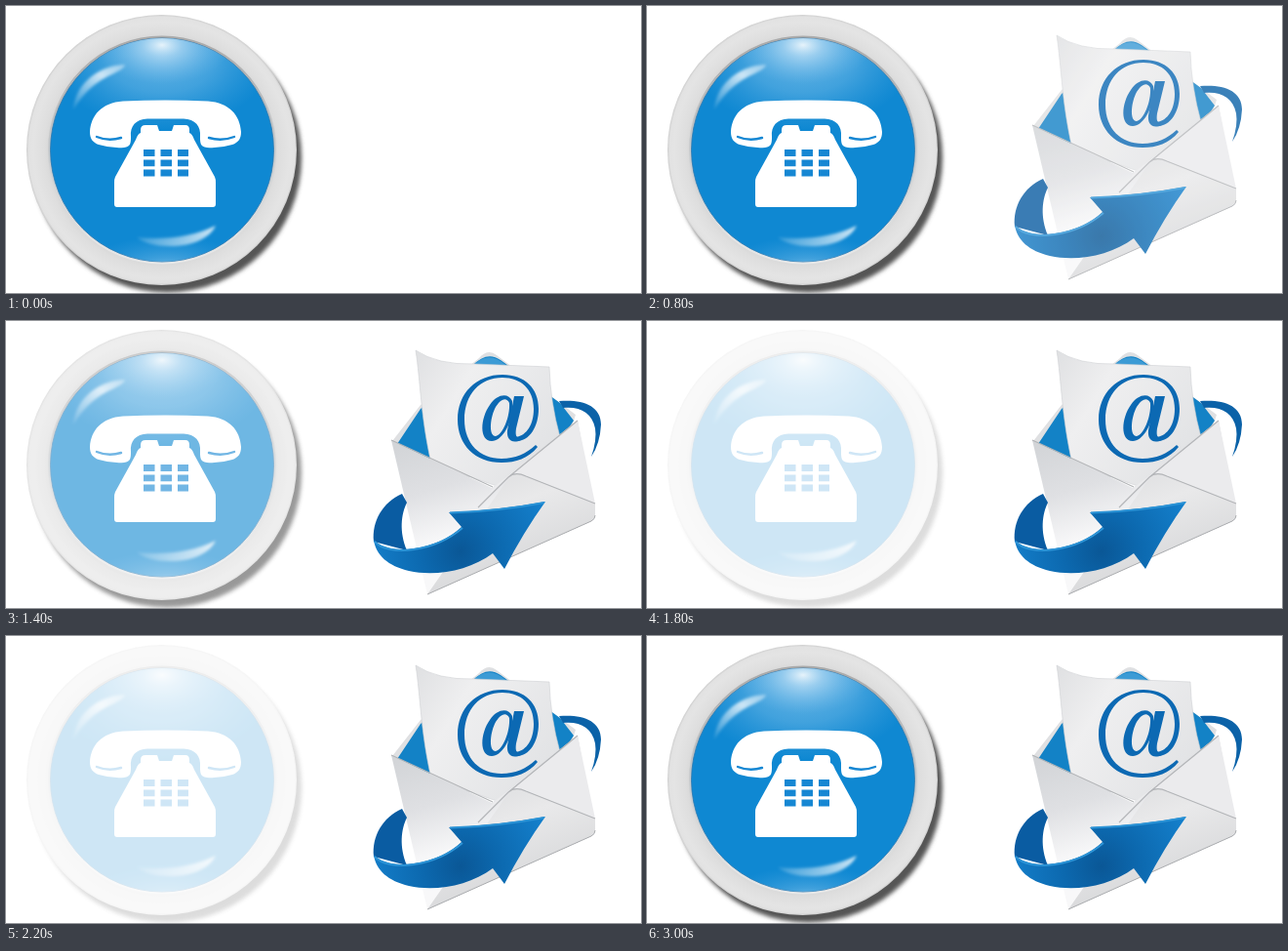
An HTML page for the animation above (3200 ms loop, 651 by 294 pixels).

```html
<!DOCTYPE html>
<html lang="en">
<head>
<meta charset="utf-8">
<title>Phone and mail</title>
<style>
html, body { margin: 0; width: 100%; height: 100%; overflow: hidden; background: #fff; }
svg { display: block; width: 651px; height: 294px; }
#phone { animation: phone 3.2s infinite; }
#mail { animation: mail 3.2s infinite; }
@keyframes mail {
  0% { opacity: 0; animation-timing-function: steps(5, end); }
  31.25%, 100% { opacity: 1; }
}
@keyframes phone {
  0% { opacity: 1; }
  31.25% { opacity: 1; animation-timing-function: steps(5, end); }
  62.5% { opacity: 0; animation-timing-function: steps(5, end); }
  93.75%, 100% { opacity: 1; }
}
</style>
</head>
<body>
<svg viewBox="0 0 651 294">
<defs>
  <filter id="soft" x="-20%" y="-20%" width="140%" height="140%"><feGaussianBlur stdDeviation="2"/></filter>
  <filter id="gloss" x="-30%" y="-30%" width="160%" height="160%"><feGaussianBlur stdDeviation="1.6"/></filter>
  <radialGradient id="ring" gradientUnits="userSpaceOnUse" cx="159.500" cy="147.500" r="138.500">
    <stop offset=".82" stop-color="#d6d6d6"/>
    <stop offset=".87" stop-color="#dedede"/>
    <stop offset=".95" stop-color="#e4e4e4"/>
    <stop offset=".985" stop-color="#e2e2e2"/>
    <stop offset="1" stop-color="#cdcdcd"/>
  </radialGradient>
  <linearGradient id="rim" x1="0" y1="0" x2="0" y2="1">
    <stop offset="0" stop-color="#a9a9a9"/>
    <stop offset=".5" stop-color="#c6cacd"/>
    <stop offset="1" stop-color="#e9e9e9"/>
  </linearGradient>
  <radialGradient id="glow">
    <stop offset="0" stop-color="#fff" stop-opacity=".85"/>
    <stop offset=".3" stop-color="#d4eafa" stop-opacity=".5"/>
    <stop offset="1" stop-color="#7cc0ee" stop-opacity="0"/>
  </radialGradient>
  <radialGradient id="haze">
    <stop offset="0" stop-color="#a4d4f2" stop-opacity=".6"/>
    <stop offset=".5" stop-color="#8cc8ee" stop-opacity=".4"/>
    <stop offset="1" stop-color="#6ab6e6" stop-opacity="0"/>
  </radialGradient>
  <linearGradient id="streak" x1="0" y1="1" x2="1" y2="0">
    <stop offset="0" stop-color="#fff" stop-opacity=".1"/>
    <stop offset=".65" stop-color="#fff" stop-opacity=".75"/>
    <stop offset="1" stop-color="#fff" stop-opacity=".4"/>
  </linearGradient>
  <linearGradient id="streak2">
    <stop offset="0" stop-color="#fff" stop-opacity=".15"/>
    <stop offset="1" stop-color="#fff" stop-opacity=".8"/>
  </linearGradient>
  <clipPath id="face"><circle cx="160" cy="147.500" r="114.500"/></clipPath>

  <linearGradient id="paper" x1="0" y1="0" x2="1" y2=".6">
    <stop offset="0" stop-color="#dfe0e2"/>
    <stop offset=".35" stop-color="#efeff0"/>
    <stop offset="1" stop-color="#e2e3e5"/>
  </linearGradient>
  <linearGradient id="side" gradientUnits="userSpaceOnUse" x1="415" y1="125" x2="445" y2="225">
    <stop offset="0" stop-color="#d3d5d8"/>
    <stop offset=".5" stop-color="#dfe0e3"/>
    <stop offset="1" stop-color="#f8f8f9"/>
  </linearGradient>
  <linearGradient id="fold" x1="0" y1="0" x2=".5" y2="1">
    <stop offset="0" stop-color="#d9dadc"/>
    <stop offset=".4" stop-color="#e9e9ea"/>
    <stop offset="1" stop-color="#d3d4d6"/>
  </linearGradient>
  <radialGradient id="band" gradientUnits="userSpaceOnUse" cx="466" cy="236" r="95">
    <stop offset="0" stop-color="#0a5796"/>
    <stop offset=".4" stop-color="#0c68ae"/>
    <stop offset="1" stop-color="#147fcb"/>
  </radialGradient>
</defs>

<g id="phone">
  <circle cx="165" cy="155.500" r="138" fill="#555" filter="url(#soft)"/>
  <circle cx="159.500" cy="147.500" r="138.500" fill="url(#ring)"/>
  <circle cx="160" cy="147.500" r="115.500" fill="none" stroke="url(#rim)" stroke-width="3"/>
  <circle cx="160" cy="147.500" r="114.500" fill="#0f88d2" stroke="#2a78b0" stroke-width=".8"/>
  <g clip-path="url(#face)">
    <ellipse cx="160" cy="52" rx="112" ry="74" fill="url(#haze)"/>
    <ellipse cx="160" cy="40" rx="70" ry="40" fill="url(#glow)"/>
    <ellipse cx="165" cy="268" rx="85" ry="32" fill="url(#glow)" opacity=".5"/>
  </g>
  <path d="M69 106C70 84 91 61 122 60C121 66 108 69 96 77C82 86 76 96 69 106Z" fill="url(#streak)" filter="url(#gloss)"/>
  <path d="M134 237C165 240 192 236 215 225C208 239 190 246 168 246C153 246 142 243 134 237Z" fill="url(#streak2)" filter="url(#gloss)"/>
  <g fill="#fff">
    <path d="M86 129C87 112 98 99 120 97.500Q163 95.500 207 97.500C229 99 240 112 241 129C241 136 238 140 232 142Q219 146 206 145C199 144 199 140 199 134C200 123 194 116 182 115.500H145C133 116 127 123 128 134C128 140 128 144 121 145Q108 146 95 142C89 140 86 136 86 129Z"/>
    <path d="M143 122H155L157 128H170L172 122H184Q188 122 188 127V130Q191 131 193 137L214 175Q215 177 215 181V203Q215 206 212 206H114Q111 206 111 203V181Q111 177 112 175L133 137Q135 131 138 130V127Q138 122 143 122Z"/>
  </g>
  <path d="M93 134Q105 139 118 135M208 135Q221 139 234 134" fill="none" stroke="#1687d3" stroke-width="2.400" stroke-linecap="round"/>
  <path d="M141 150.500H187M141 160.800H187M141 171H187" stroke="#1687d3" stroke-width="6.800" stroke-dasharray="11.500 6"/>
</g>

<g id="mail">
  <path d="M396 123L425 86L485 38Q494 28 503 35L584 96L566 150L430 165Z" fill="#dfe0e2"/>
  <path d="M401 126L425 90L478 46Q493 30 507 40L568 84L582 102L560 135L436 150Z" fill="#1382c6"/>
  <path d="M476 48Q494 28 512 45L514 48Z" fill="#3c9bd5"/>
  <path d="M420 30Q442 45 480 44L557 47Q558 83 568 119L512 172L436 146C425 98 425 62 420 30Z" fill="url(#paper)" stroke="#cfd1d3" stroke-width=".6"/>

  <path d="M395 122L498 171L586 102L604 199Q604 203 600 205L432 280Z" fill="url(#side)"/>
  <path d="M586 102L604 187L532 158Q522 154 514 162L484 192L500 170Z" fill="#ebebed"/>
  <path d="M432 280L515 161Q522 154 533 159L604 187V198Q604 203 600 205Z" fill="url(#fold)"/>
  <path d="M395 122L499 170M586 102L515 160L484 191M515 160Q522 154 533 159L604 187" fill="none" stroke="#b3b5b8" stroke-width="1.200"/>
  <path d="M432 280L600 205Q604 203 604 199" fill="none" stroke="#a9abae"/>

  <path d="M567 82C590 80 610 86 610 106Q609 126 600 139Q606 122 604 110C601 94 588 87 571 89Z" fill="#0b62a8"/>

  <g fill="#0c69b3" fill-rule="evenodd">
    <path d="M519 82C515 73 503 75 496 86C486 100 485 123 498 123C508 123 516 108 519 95ZM516 84C513 77 506 80 501 90C496 101 495 118 502 118C509 117 517 98 516 84Z"/>
    <path d="M521 77H531L523 110C522 117 523 120 527 119L528 122C519 126 513 122 514 112Z"/>
    <path d="M545 129C535 141 523 145 508 145C481 145 463 127 463 101C463 74 482 55 509 55C532 55 546 69 546 90C546 109 536 123 524 123L523 119C534 117 541 106 541 90C541 70 528 58 509 58C486 58 470 75 470 101C470 126 486 141 508 141C522 141 533 136 543 127Z"/>
  </g>

  <path d="M406 177C386 186 375 205 377 226L411 235C403 216 405 198 411 186Z" fill="#0a5ca2"/>
  <path d="M377 224C384 232 400 236 418 233C440 230 455 222 467 211L454 196Q505 194 553 185Q530 217 511 254L499 238C475 256 440 262 413 256C392 251 379 240 377 224Z" fill="url(#band)"/>
  <path d="M378 226C384 233 400 237 418 234C440 231 455 223 468 212M455 196.500Q505 195 552 186" fill="none" stroke="#2b93d6" stroke-width="2"/>
</g>
</svg>
</body>
</html>
```
